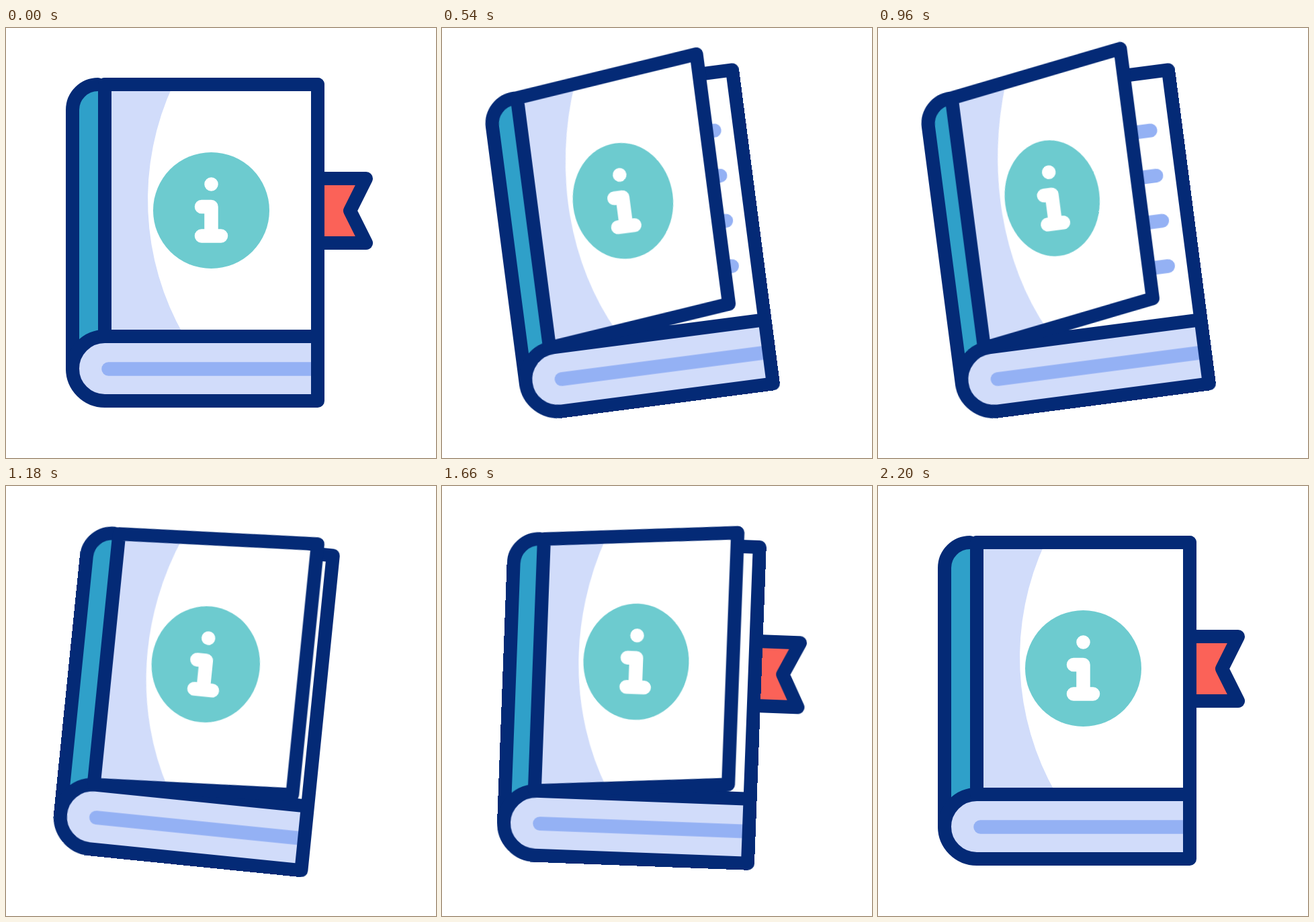
An HTML page for the animation above (2400 ms loop, 640 by 640 pixels).

```html
<!DOCTYPE html>
<html lang="en">
<head>
<meta charset="utf-8">
<title>Swinging guide book</title>
<style>
  /* 0 = cover shut, 1 = cover at its widest */
  @property --open { syntax: "<number>"; inherits: true; initial-value: 0; }

  :root {
    --navy: #042a76;
    --teal: #2fa0c9;
    --pale: #d1dcfa;
    --stripe: #94b1f4;
    --mint: #6dcbcf;
    --red: #fb6258;
  }
  html, body { margin: 0; width: 100%; height: 100%; overflow: hidden; background: #fff; }
  svg { display: block; width: 640px; height: 640px; }

  .line { stroke: var(--navy); stroke-width: 20; stroke-linecap: round; stroke-linejoin: round; }
  .rule { fill: none; stroke: var(--stripe); stroke-width: 20.5; stroke-linecap: round; }
  .letter { fill: none; stroke: #fff; stroke-width: 20.5; stroke-linecap: round; stroke-linejoin: round; }
  .fixed { vector-effect: non-scaling-stroke; }

  .book, .bookmark, .cover {
    animation: 2400ms cubic-bezier(.333, 0, .667, 1) infinite;
  }
  .book { animation-name: swing; transform-origin: 281.5px 319.5px; }
  .bookmark { animation-name: slide; }
  .cover {
    animation-name: open;
    transform-origin: 103px 0;
    transform: scaleX(calc(1 - .227 * var(--open)));
  }
  .board { transform-origin: 147px 0; transform: skewY(calc(var(--open) * -8.96deg)); }
  .icon { transform: translateY(calc(var(--open) * -25px)); }

  @keyframes swing {
    0%, 8.333% { transform: rotate(0deg); }
    33.125% { transform: rotate(-12.2deg); }
    58% { transform: rotate(13deg); }
    78.333% { transform: rotate(-5.8deg); }
    91.667%, 100% { transform: rotate(0deg); }
  }
  @keyframes slide {
    0%, 8.333% { transform: translateX(0); }
    28.96%, 54.333% { transform: translateX(-110px); }
    75.833% { transform: translateX(24px); }
    86.667%, 100% { transform: translateX(0); }
  }
  @keyframes open {
    0%, 8.333% { --open: 0; }
    33.125% { --open: 1; }
    58.333% { --open: 0; }
    75.833% { --open: .6; }
    90%, 100% { --open: 0; }
  }
</style>
</head>
<body>
<svg viewBox="0 0 640 640">
  <g class="book">
    <path class="bookmark line" fill="var(--red)" d="M430 224H536L512 272L536 320H430Z"/>

    <!-- inner page -->
    <path class="line" fill="#fff" d="M147 84H464V459H147Z"/>
    <path class="rule" d="M220 170H426M220 237.8H426M220 305.6H426M220 373.4H426"/>

    <!-- spine -->
    <path fill="var(--teal)" d="M99 507V122A38 38 0 0 1 137 84H147V507Z"/>
    <path class="line" fill="none" d="M99 507V122A38 38 0 0 1 137 84"/>

    <!-- page block -->
    <path fill="var(--pale)" d="M464 459H147A48 48 0 0 0 147 555H464Z"/>
    <path class="rule" d="M152.5 507.5H456"/>
    <path class="line" fill="none" d="M464 459H147A48 48 0 0 0 147 555H464Z"/>

    <g class="cover">
      <g class="board">
        <path fill="#fff" d="M147 84H464V459H147Z"/>
        <path fill="var(--pale)" d="M147 84H249A407 407 0 0 0 265.5 459H147Z"/>
        <path class="line fixed" fill="none" d="M147 84H464V459H147Z"/>
      </g>
      <g class="icon">
        <circle cx="305.5" cy="271.5" r="86.5" fill="var(--mint)"/>
        <path class="letter fixed" d="M305.5 232.5h.01M291 266H305.5V309.5M291 309.5H320"/>
      </g>
    </g>
  </g>
</svg>
</body>
</html>
```
